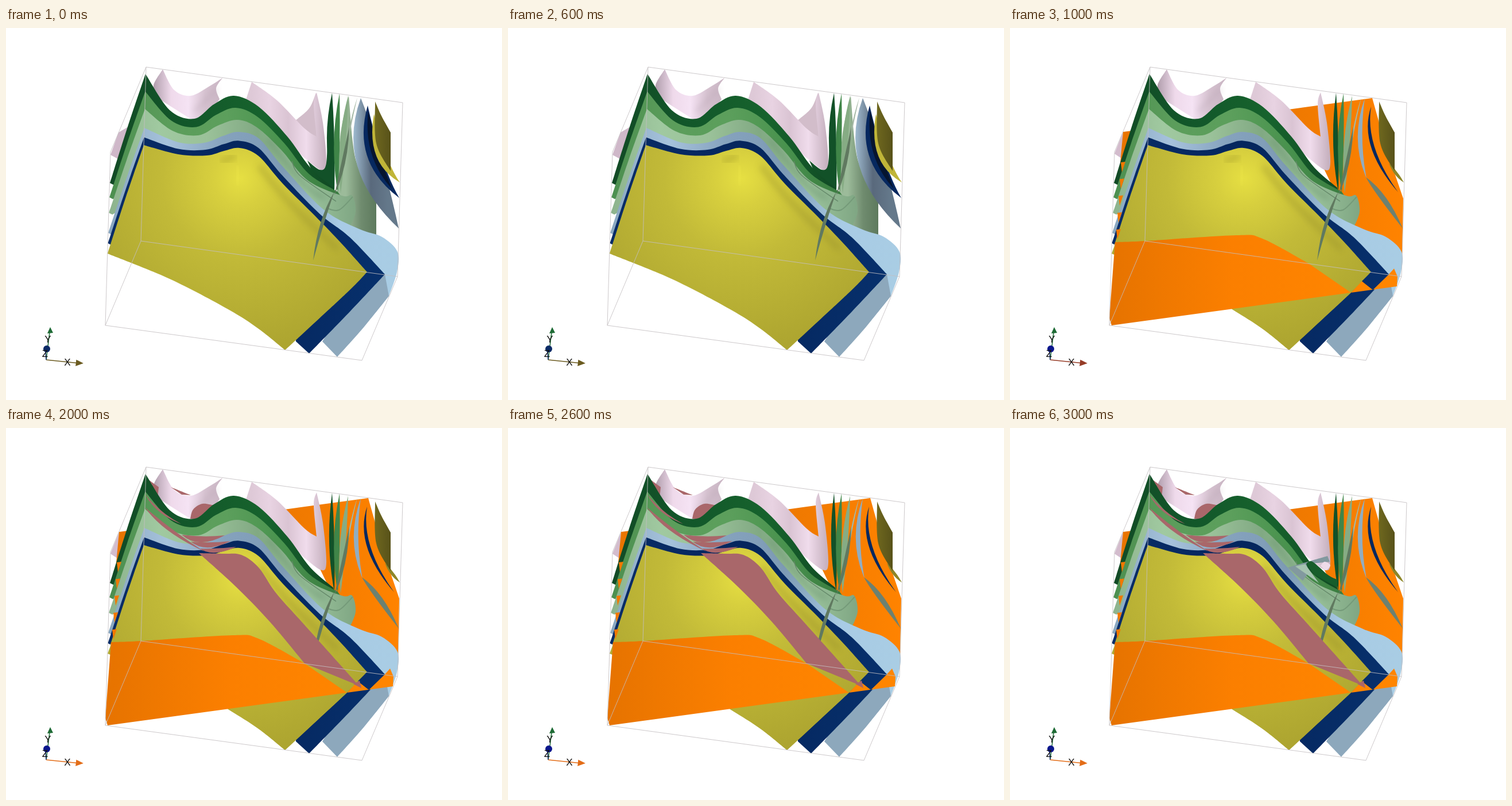
Recreate the animation shown at these times as an HTML page. Size 864 px wide and 648 px high, loop 4 s.

```html
<!DOCTYPE html>
<html lang="en">
<head>
<meta charset="utf-8">
<title>Layered surfaces</title>
<style>
  html, body { margin: 0; width: 100%; height: 100%; overflow: hidden; background: #fff; }
  svg { display: block; width: 100vw; height: 100vh; }
  text { font: 17px "Liberation Sans", Arial, sans-serif; text-anchor: middle; fill: #111; }
</style>
</head>
<body>
<svg viewBox="0 0 864 648">
  <defs id="defs">
    <radialGradient id="yellow" gradientUnits="userSpaceOnUse" cx="408" cy="262" r="300">
      <stop offset="0" stop-color="#e6df42"/><stop offset=".16" stop-color="#d7cf3e"/>
      <stop offset=".45" stop-color="#c2ba38"/><stop offset="1" stop-color="#ada530"/>
    </radialGradient>
    <filter id="soft" x="-30%" y="-30%" width="160%" height="160%"><feGaussianBlur stdDeviation="6"/></filter>
  </defs>
  <g id="scene"></g>
  <path d="M182 216L244 68L691 130L682 433L235 371L173 518L620 579L682 433M244 68L235 371M182 216L173 518"
        fill="none" stroke="#c4bfc1" opacity=".85"/>
  <g stroke-width="1.5">
    <path d="M70 578L76 530" stroke="#1e6b35"/>
    <path d="M77 521L82 531L72 532Z" fill="#1e6b35"/>
    <path d="M70 578L69 564" stroke="#143070"/>
    <circle id="ball" cx="71" cy="559" r="6"/>
    <g id="xAxis"><path d="M70 578L123 583.5"/><path d="M123 579L133 584L122 588Z"/></g>
    <text x="73" y="548">Y</text><text x="68" y="573">Z</text><text x="107" y="588">X</text>
  </g>
</svg>
<script>
const $ = id => document.getElementById(id);
const ALL = '0123', FIRST = '0', LATER = '123', RUST = '23', LAST = '3';

// Horizontal gradient with evenly spaced colours
function gradient(id, x1, x2, ...colors) {
  const stops = colors.map((c, i) => `<stop offset="${i / (colors.length - 1)}" stop-color="${c}"/>`);
  $('defs').insertAdjacentHTML('beforeend',
    `<linearGradient id="${id}" gradientUnits="userSpaceOnUse" x1="${x1}" x2="${x2}" y1="0" y2="0">${stops.join('')}</linearGradient>`);
}
gradient('dark', 180, 590, '#124a25', '#12572a', '#17632d', '#0f4522');
gradient('mid', 180, 590, '#4c8f4f', '#5b9d5b', '#5c9f5c', '#48924d', '#38793e');
gradient('pale', 180, 610, '#8db38d', '#a0c9a0', '#9ac199', '#81a983', '#9cc49d', '#7fa683');
gradient('blue', 180, 682, '#89a7c0', '#a6c2dc', '#85a2bd', '#7e9bb6', '#a8cbe5', '#a9cde4');
gradient('navy', 180, 660, '#082c67', '#05265d', '#07306c');
gradient('pink', 258, 377, '#b3a0af', '#efdaeb', '#f5e3f4', '#d6c2d0', '#c9b5c3');
gradient('pinkEast', 428, 555, '#dec9d7', '#e8d3e2', '#dac4d3', '#f0dcec', '#c7b2c0');
gradient('wall', 592, 646, '#9cbb9a', '#6f8b6e', '#5d795d');
gradient('slate', 606, 665, '#9db8cd', '#59697c', '#64788a');
gradient('orange', 173, 600, '#e67300', '#fb7f00', '#ff8500');
gradient('orangeBack', 485, 685, '#ee7800', '#ff8300');
gradient('olive', 640, 671, '#70691f', '#575119');

const points = run => run.trim().split(/\s+/).map(p => p.split(',').map(Number));
const lerp = (a, b, f) => a + (b - a) * f;

// Runs split by "|" are smooth curves, joined to each other by straight lines.
function outline(runs) {
  return runs.split('|').map((run, k) => {
    const p = points(run);
    let d = (k ? 'L' : 'M') + p[0];
    for (let i = 0; i + 1 < p.length; i++) {
      const a = p[i - 1] || p[i], b = p[i], c = p[i + 1], e = p[i + 2] || c;
      const near = j => b[j] + (c[j] - a[j]) / 6, far = j => c[j] - (e[j] - b[j]) / 6;
      d += `C${near(0)} ${near(1)} ${far(0)} ${far(1)} ${c}`;
    }
    return d;
  }).join('');
}

const parts = [];
function add(stages, d, attrs) {
  const el = document.createElementNS('http://www.w3.org/2000/svg', 'path');
  el.setAttribute('d', d);
  for (const key in attrs) el.setAttribute(key, attrs[key]);
  $('scene').append(el);
  parts.push({ el, stages });
}
const paint = color => ({ fill: color[0] === '#' ? color : `url(#${color})` });
const fill = (stages, color, runs) => add(stages, outline(runs) + 'Z', paint(color));
// Thin sheet seen nearly edge-on: two bows between the same ends
const blade = (stages, color, tip, end, bow1, bow2) =>
  add(stages, `M${tip}Q${bow1} ${end}Q${bow2} ${tip}Z`, paint(color));
const line = (color, width, runs, more) =>
  add(ALL, outline(runs), { fill: 'none', stroke: color, 'stroke-width': width, ...more });
const shade = (color, width, opacity, runs) =>
  line(color, width, runs, { opacity, filter: 'url(#soft)', 'stroke-linecap': 'round' });

// Steep sheets at the back right
fill(FIRST, 'wall', '597,118 582,190 578,290 600,352 | 645,367 | 645,278 610,232 597,118');
blade(FIRST, 'slate', '618,122', '684,349', '573,245', '655,215');
blade(FIRST, '#06285f', '630,135', '685,296', '602,234', '655,245');
blade(FIRST, '#06152f', '631,145', '672,280', '622,225', '650,225');
fill(LATER, 'orangeBack', '485,142 | 631,122 | 657,215 685,297 | 683,400 | 600,355 | 520,190');
blade(LATER, '#91adc1', '618,122', '621,262', '592,195', '608,195');
blade(LATER, '#6c8171', '620,260', '684,349', '632,283', '658,287');
blade(LATER, '#06285f', '629,137', '676,286', '606,205', '618,205');
blade(FIRST, '#c0b538', '641,150', '686,269', '626,234', '662,235');
blade(LATER, '#8d8628', '660,235', '686,269', '668,258', '676,250');
fill(ALL, 'olive', '643,128 654,153 670,182 | 670,249 645,201 643,128');

// Pink sheets
fill(FIRST, '#cfb8c9', '213,172 196,182 | 182,221 | 195,228');
fill(LATER, '#d3bccd', '197,181 182,219 | 194,227');
fill(LATER, 'orange', '197,181 | 212,179 | 201,235 | 192,235');
fill(ALL, 'pink', '273,72 293,108 322,118 355,101 377,87 | 377,87 366,105 372,124 | 340,170 | 264,122 257,100 273,72');
shade('#b5a0b0', 6, .5, '365,108 330,145');
fill(FIRST, '#d2bdca', '540,113 528,140 503,162 | 541,192');
fill(ALL, 'pinkEast', '428,94 472,126 520,175 541,189 | 541,189 536,133 541,112 | 541,112 552,165 558,235 548,247 515,222 | 440,145 | 418,125 428,94');
fill(RUST, '#a9676a', '287,103 322,117 | 306,116');
fill(RUST, '#a9676a', '321,158 326,142 342,132 363,135 | 350,160');
fill(RUST, '#a9676a', '244,87 266,103 | 264,122');

// Upright green blades
fill(FIRST, '#125128', '560,170 558,235 547,247 525,231 | 540,266 | 572,286');
blade(FIRST, '#125128', '568,113', '572,286', '548,200', '574,200');
blade(LATER, '#125128', '568,113', '572,286', '556,200', '574,200');
blade(ALL, '#408548', '581,114', '578,288', '563,200', '583,200');
blade(ALL, '#86ac84', '596,118', '583,288', '574,200', '594,200');
blade(ALL, '#a4b7a4', '612,121', '589,240', '594,175', '598,180');

// Stacked layers. Each family blends between two key curves; every layer adds its own right end.
const greens = [
  '243,80 285,143 328,158 362,133 397,118 440,137 490,189 530,243 570,278',
  '242,141 290,179 335,187 369,170 403,160 437,173 480,213 525,265 585,292'];
const blues = [
  '241,174 300,199 345,200 378,188 405,181 440,192 480,239 553,316 615,350',
  '240,204 300,220 350,222 380,214 407,209 440,223 482,271 540,329 585,376'];
function layer(color, family, blend, tipY, end, hidden = '| 480,300 | 330,240') {
  const [top, base] = family.map(points);
  const edge = top.map((p, i) => p.map((v, j) => lerp(v, base[i][j], blend)));
  const tipX = 181 - (tipY - 270) / 30, [x, y] = edge[0];
  const rim = `${tipX},${tipY} ${lerp(tipX, x, .5) - 1},${lerp(tipY, y, .5)} ${x},${y}`;
  const back = hidden && `${hidden} | ${tipX + 6},${tipY + 3}`;
  fill(ALL, color, `${rim} | ${edge.join(' ')} ${end} ${back}`);
}
layer('dark', greens, 0, 270, '| 572,288');
layer('mid', greens, .5, 295, '| 584,294');
layer('pale', greens, 1, 322, '603,292 609,320 598,349');
layer('blue', blues, 0, 357, '655,364 682,390 681,425 667,467 | 600,480');
fill(ALL, '#8da8bc', '660,429 | 667,467 620,525 577,573 | 551,546 | 600,470');
layer('navy', blues, .55, 375, '660,429 | 660,429 600,493 528,567 | 505,546');
layer('yellow', blues, 1, 393, '629,425 | 629,425 594,461 486,561 | 486,561 440,524 387,490 285,437 177,393', '');

// Soft relief and creases
shade('#8b8424', 9, .35, '378,232 397,224');
shade('#8e8728', 9, .38, '443,243 490,300 575,383');
shade('#f0e94b', 14, .3, '405,246 402,268');
shade('#527a59', 8, .4, '458,196 520,272 552,295');
line('#65896a', 1.5, '498,232 512,257 575,302');
line('#749a79', 2, '559,314 580,317 604,294');
blade(ALL, '#607960', '598,172', '572,292', '584,235', '596,240');
blade(ALL, '#607960', '572,285', '535,405', '543,333', '553,340');

// Orange plane: teeth between the rims, then the cut below
for (let i = 0; i < 5; i++) {
  const x = 193 - 2 * i, y = 234 + 29.3 * i;
  fill(LATER, '#f17800', `${x},${y} | ${x + 8},${y - 1} | ${x + 2},${y + 17}`);
}
fill(LATER, '#fff', '184,374 | 387,490 | 490,565 | 170,565 | 170,400');
fill(LATER, '#b2aa32', '184,374 | 177,393 | 182,395');
fill(LATER, 'yellow', '387,490 440,524 486,561 | 594,461');
fill(LATER, 'orange', '183,373 235,371 395,361 440,367 520,410 | 594,461 | 177,518 | 173,505');
fill(LATER, 'orange', '594,461 | 613,441 | 632,456 | 660,429 | 669,419 | 675,433 | 674,450');
fill(LATER, 'navy', '613,441 | 629,425 | 660,429 | 632,456');

// Rust plane
fill(RUST, '#a9676a', '336,218 378,219 410,221 440,243 470,287 520,343 615,449 | 520,410 | 520,410 460,338 400,276 336,218');
fill(RUST, '#a9676a', '605,446 | 616,440 | 619,453');
blade(RUST, '#a9676a', '242,115', '305,167', '260,150', '268,148');
blade(RUST, '#a9676a', '242,138', '345,215', '270,180', '285,176');
for (let i = 0; i < 3; i++)
  blade(RUST, '#a9676a', [306 + 16 * i, 186 + 12 * i], [381 + 10 * i, 187 + 10 * i], [335 + 12 * i, 212 + 7 * i], [345 + 12 * i, 191 + 10 * i]);

// Small slate plane by the pocket
fill(LAST, '#82999f', '484,243 553,223 | 557,233 | 516,237 | 521,250 | 510,266');
fill(LAST, '#a5c3b0', '497,241 | 514,237 | 538,270');
fill(LAST, '#175d2b', '516,236 527,233 554,256 570,264 | 570,278 530,255');
fill(LAST, '#eedbea', '541,240 548,233 558,239 550,248 541,240');

const axisColors = ['#6b5b20', '#963c27', '#e36d18', '#e36d18'];
let shown = -1;
function draw(now) {
  const stage = Math.floor(now / 1000) % 4;
  if (stage !== shown) {
    shown = stage;
    for (const { el, stages } of parts) el.style.display = stages.includes(stage) ? '' : 'none';
    $('xAxis').setAttribute('fill', axisColors[stage]);
    $('xAxis').setAttribute('stroke', axisColors[stage]);
    $('ball').setAttribute('fill', stage ? '#0a168c' : '#0b2a66');
  }
  requestAnimationFrame(draw);
}
draw(performance.now());
</script>
</body>
</html>
```
